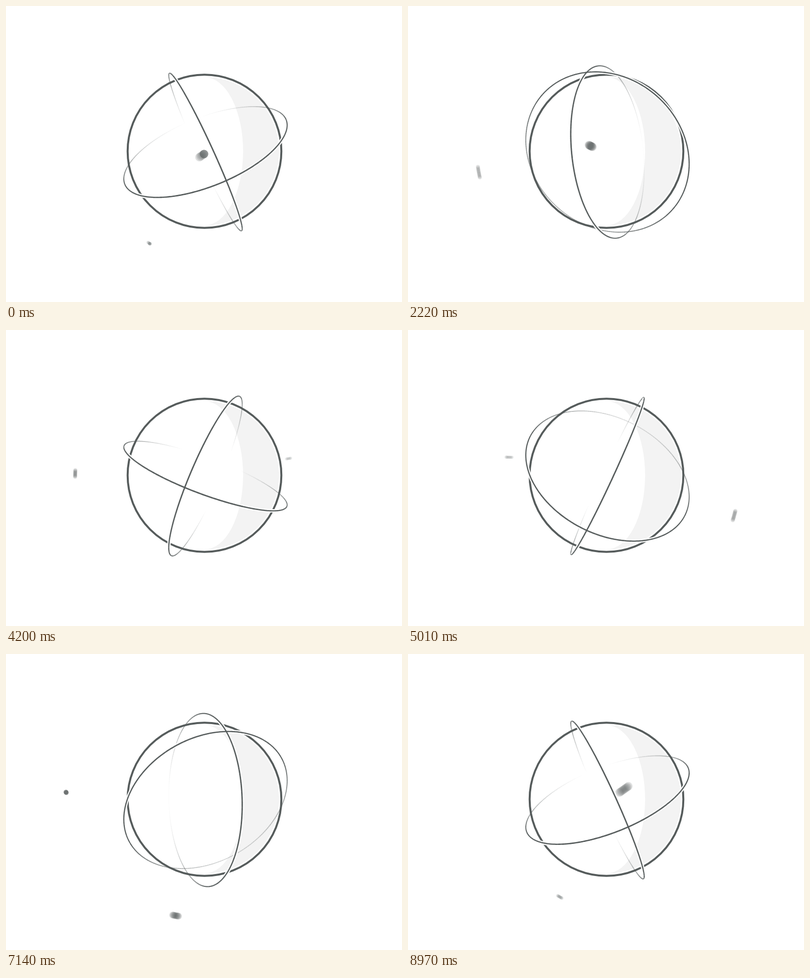
Write an HTML page with a canvas that moves like this. It is 800x600 px and loops after 9 s.

```html
<!DOCTYPE html>
<html>
<head>
<meta charset="utf-8">
<title>Orbiting rings</title>
<style>
  html, body { margin: 0; width: 800px; height: 600px; overflow: hidden; background: #fff; }
  canvas { display: block; }
</style>
</head>
<body>
<canvas id="stage" width="800" height="600"></canvas>
<script>
const ctx = document.getElementById('stage').getContext('2d');
const LOOP = 9000, STEP = 30, TAU = Math.PI * 2, DEG = Math.PI / 180;
const INK = '#565c5c', SHADE = '#f3f3f3';
const globe = { x: 401, y: 294.5, r: 155.3 };
const clamp = v => Math.min(1, Math.max(0, v));

// Times of the few poses that steer the dots.
const beats = [0, 1350, 3060, 4200, 5790, 7140];

// Smooth periodic curve through one angle per beat; each loop adds `turns` revolutions.
function angle(turns, ...values) {
  const n = beats.length;
  const key = i => {
    const lap = Math.floor(i / n), k = i - lap * n;
    return [beats[k] + lap * LOOP, values[k] + lap * turns * 360];
  };
  const slope = i => {
    const [t0, v0] = key(i - 1), [t1, v1] = key(i + 1);
    return (v1 - v0) / (t1 - t0);
  };
  return time => {
    let i = 0;
    while (key(i + 1)[0] <= time) i++;
    const [t0, v0] = key(i), [t1, v1] = key(i + 1);
    const span = t1 - t0, u = (time - t0) / span, w = 1 - u;
    return DEG * (v0 * w * w * (1 + 2 * u) + v1 * u * u * (3 - 2 * u)
      + span * u * w * (slope(i) * w - slope(i + 1) * u));
  };
}

// Pitch is measured from the viewer's axis, bearing around it.
const dots = [
  { pitch: angle(0, 105, 105, 65, 83, 65, 36), bearing: angle(5, 121, 289, 767, 902, 1293, 1544) },
  { pitch: angle(4, 0, 284, 430, 601, 1035, 1148), bearing: angle(0, 145, 211, 192, 167, 215, 184) }
];

function dotAt({ pitch, bearing }, t) {
  const p = pitch(t), b = bearing(t), z = Math.cos(p);
  const radius = 247 * Math.sin(p) / (1 - .48 * z);
  return { x: 400 + radius * Math.cos(b), y: 300 + radius * Math.sin(b), z };
}

// Motion blur: half-frame shutter centred on the frame time.
function drawDot(dot, t) {
  const samples = 9;
  ctx.fillStyle = INK;
  for (let i = 0; i < samples; i++) {
    const { x, y, z } = dotAt(dot, Math.max(0, t + STEP / 2 * (i / (samples - 1) - .5)));
    ctx.globalAlpha = .19 * clamp(1 + 1.2 * z);
    ctx.beginPath();
    ctx.arc(x, y, 3.7 / (1 - .57 * z), 0, TAU);
    ctx.fill();
  }
  ctx.globalAlpha = 1;
}

function ringPoints(tilt, phi) {
  const s = Math.sin(tilt * DEG), c = Math.cos(tilt * DEG);
  const sp = Math.sin(phi * DEG), cp = Math.cos(phi * DEG);
  const count = 240, r = 175.6;
  return Array.from({ length: count + 1 }, (_, i) => {
    const a = Math.cos(i / count * TAU), b = Math.sin(i / count * TAU);
    return {
      x: 403 + r * a * c,
      y: 296 + r * (b * sp - a * s * cp),
      z: a * s * sp + b * cp
    };
  });
}

function strokeRing(points, visible, style) {
  for (let i = 1; i < points.length; i++) {
    const p = points[i - 1], q = points[i], z = (p.z + q.z) / 2;
    if (!visible(z)) continue;
    const { color, width, alpha } = style(z);
    ctx.strokeStyle = color;
    ctx.lineWidth = width;
    ctx.globalAlpha = alpha;
    ctx.beginPath();
    ctx.moveTo(p.x, p.y);
    ctx.lineTo(q.x + (q.x - p.x) * .08, q.y + (q.y - p.y) * .08);
    ctx.stroke();
  }
  ctx.globalAlpha = 1;
}

const line = z => ({ color: INK, width: 2.1 + .7 * z, alpha: clamp((z + .92) / .9) });
const halo = () => ({ color: '#fff', width: 7, alpha: 1 });
const front = z => z > 0;
const back = z => z <= 0;

function drawShade() {
  ctx.fillStyle = SHADE;
  ctx.beginPath();
  ctx.arc(globe.x, globe.y, 150.5, -Math.PI / 2, Math.PI / 2);
  ctx.ellipse(globe.x, globe.y, 78, 150.5, 0, Math.PI / 2, -Math.PI / 2, true);
  ctx.fill();
}

function drawGlobe() {
  ctx.strokeStyle = INK;
  ctx.lineWidth = 4;
  ctx.beginPath();
  ctx.arc(globe.x, globe.y, globe.r, 0, TAU);
  ctx.stroke();
}

function draw(t) {
  const turn = t / LOOP * 360;
  const rings = [ringPoints(20, turn + 25), ringPoints(-65, turn - 12)];
  ctx.clearRect(0, 0, 800, 600);
  drawShade();
  rings.forEach(ring => strokeRing(ring, back, line));
  drawGlobe();
  dots.forEach(dot => drawDot(dot, t));
  rings.forEach(ring => strokeRing(ring, front, halo));
  rings.forEach(ring => strokeRing(ring, front, line));
}

const start = performance.now();
function tick() {
  const t = (performance.now() - start) % LOOP;
  draw(Math.floor(t / STEP) * STEP);
  requestAnimationFrame(tick);
}
tick();
</script>
</body>
</html>
```
